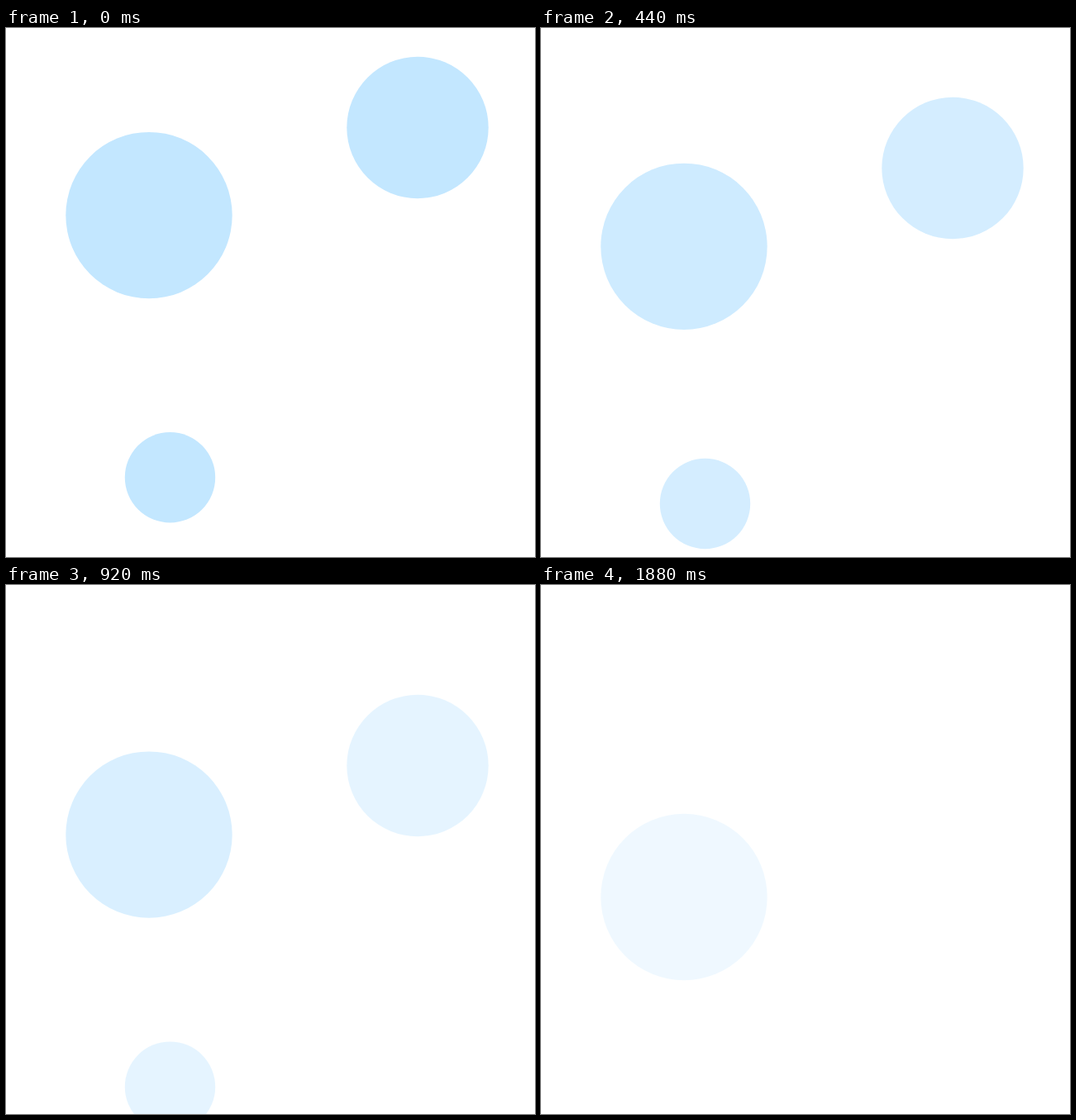
An HTML page that plays this animation: 640x640 px, repeating every 2600 ms.

```html
<!DOCTYPE html>
<html lang="en">
<head>
<meta charset="utf-8">
<title>Falling bubbles</title>
<style>
  html, body { margin: 0; width: 100%; height: 100%; overflow: hidden; background: #fff; }
  svg { display: block; width: 100%; height: 100%; }
  circle { fill: #c3e7ff; filter: blur(0.6px); }
</style>
</head>
<body>
<svg id="stage" viewBox="0 0 640 640"></svg>
<script>
const LOOP = 2600;
const STEP = 80;
const LAST_STEP = 24;

// speed is in pixels per step; life is the number of steps until fully faded
const bubbles = [
  { x: 173, y: 226.6, r: 100.7, speed: 6.29, life: 32.5 },
  { x: 498, y: 120.5, r: 85.7, speed: 8.17, life: 20.8 },
  { x: 198.5, y: 543.8, r: 54.7, speed: 5.28, life: 20.8 }
];

const stage = document.getElementById("stage");
for (const b of bubbles) {
  b.node = document.createElementNS("http://www.w3.org/2000/svg", "circle");
  b.node.setAttribute("cx", b.x);
  b.node.setAttribute("r", b.r);
  stage.appendChild(b.node);
}

function render(time) {
  const step = Math.min(LAST_STEP, Math.floor((time % LOOP + STEP / 2) / STEP));
  for (const b of bubbles) {
    b.node.setAttribute("cy", b.y + b.speed * step);
    b.node.setAttribute("opacity", Math.max(0, 1 - step / b.life));
  }
}

const start = performance.now();
function tick() {
  render(performance.now() - start);
  requestAnimationFrame(tick);
}
tick();
</script>
</body>
</html>
```
